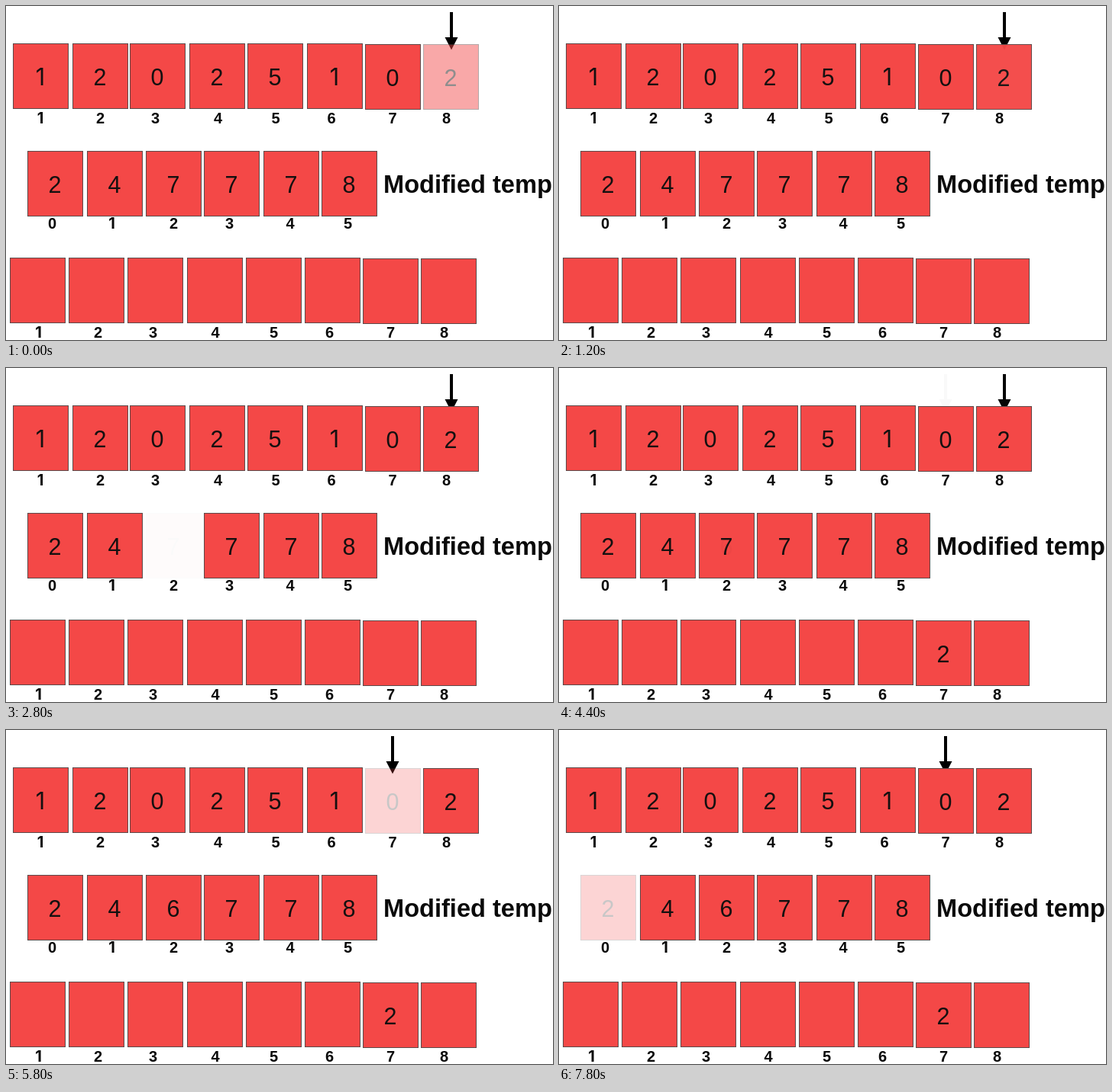
An HTML page for the animation above (8000 ms loop, 716 by 438 pixels).

```html
<!DOCTYPE html>
<html lang="en">
<head>
<meta charset="utf-8">
<title>Counting sort</title>
<style>
  html, body { margin: 0; width: 100%; height: 100%; overflow: hidden; background: #fff; }
  svg { display: block; width: 716px; height: 438px; }
  text { font-family: "Liberation Sans", Arial, sans-serif; fill: #0a0a0a; text-anchor: middle; }
  text.one { font-family: Inter, Roboto, sans-serif; }
  .digit { font-size: 30.5px; fill: #141010; }
  .label { font-size: 20px; font-weight: bold; }
  .title { font-size: 32.6px; font-weight: bold; text-anchor: start; }
  rect { fill: #f44847; stroke: #5c4a4a; stroke-width: 1; }
</style>
</head>
<body>
<svg id="stage" viewBox="0 0 716 438"></svg>
<script>
const LOOP = 8000;
const stage = document.getElementById('stage');

function add(parent, tag, attrs, content = '') {
  const el = document.createElementNS('http://www.w3.org/2000/svg', tag);
  for (const key in attrs) el.setAttribute(key, attrs[key]);
  el.textContent = content;
  parent.append(el);
  return el;
}

// The "1" comes from a font whose figure has no foot.
function addText(parent, kind, x, y, content) {
  return add(parent, 'text', { x, y, class: kind + (content === '1' ? ' one' : '') }, content);
}

function addBox(x, y, value) {
  const group = add(stage, 'g', {});
  add(group, 'rect', { x: x + 0.5, y: y + 0.5, width: 72, height: 85 });
  group.digit = addText(group, 'digit', x + 36, y + 54.5, value);
  return group;
}

function addRow(lefts, top, values, labelXs, labelY, firstLabel, lowered) {
  labelXs.forEach((x, i) => addText(stage, 'label', x, labelY, String(firstLabel + i)));
  return lefts.map((x, i) => addBox(x, top + (i >= 6 ? lowered : 0), values[i] || ''));
}

function addArrow(x) {
  return add(stage, 'path', { d: `M${x - 2} 8h4v33h6.5l-8.5 16.5l-8.5 -16.5h6.5z` });
}

const arrowAt8 = addArrow(583);
const arrowAt7 = addArrow(506);

const input = addRow([9, 87, 162, 240, 316, 394, 470, 546], 49, '12025102',
  [45, 123.5, 195.5, 277.5, 353, 426, 506, 576.5], 153.5, 1, 1);
const temp = addRow([28, 106, 183, 259, 337, 413], 190, '247778',
  [60.5, 138.5, 219.5, 292.5, 372, 447.5], 291.5, 0, 0);
const output = addRow([5, 82, 159, 237, 314, 391, 467, 543], 330, '',
  [42.5, 120.5, 192.5, 274, 350.5, 423.5, 503.5, 573.5], 434.5, 1, 1);
const decremented = addBox(183, 190, '6');
output[6].digit.textContent = '2';
addText(stage, 'title', 494, 245, 'Modified temp');

const blinks = [
  { box: input[7], start: -740, count: 2 },
  { box: temp[2], start: 1260, count: 2 },
  { box: input[6], start: 5460, count: 1 },
  { box: temp[0], start: 6460, count: 2 },
];

// Each blink takes one second: smoothly out and back in.
function blinkOpacity(t, start, count) {
  const cycles = (t - start) / 1000;
  return cycles < 0 || cycles > count ? 1 : (1 + Math.cos(2 * Math.PI * cycles)) / 2;
}

function ease(t, start, end) {
  const p = Math.min(1, Math.max(0, (t - start) / (end - start)));
  return (1 - Math.cos(Math.PI * p)) / 2;
}

const setOpacity = (el, value) => el.setAttribute('opacity', value.toFixed(3));

function draw(t) {
  for (const { box, start, count } of blinks) setOpacity(box, blinkOpacity(t, start, count));
  setOpacity(output[6].digit, ease(t, 3260, 4260));
  const dissolve = ease(t, 4300, 5350);
  setOpacity(decremented, dissolve);
  setOpacity(arrowAt8, 1 - dissolve);
  setOpacity(arrowAt7, dissolve);
}

const begin = performance.now();
function tick() {
  draw((performance.now() - begin) % LOOP);
  requestAnimationFrame(tick);
}
draw(0);
requestAnimationFrame(tick);
</script>
</body>
</html>
```
